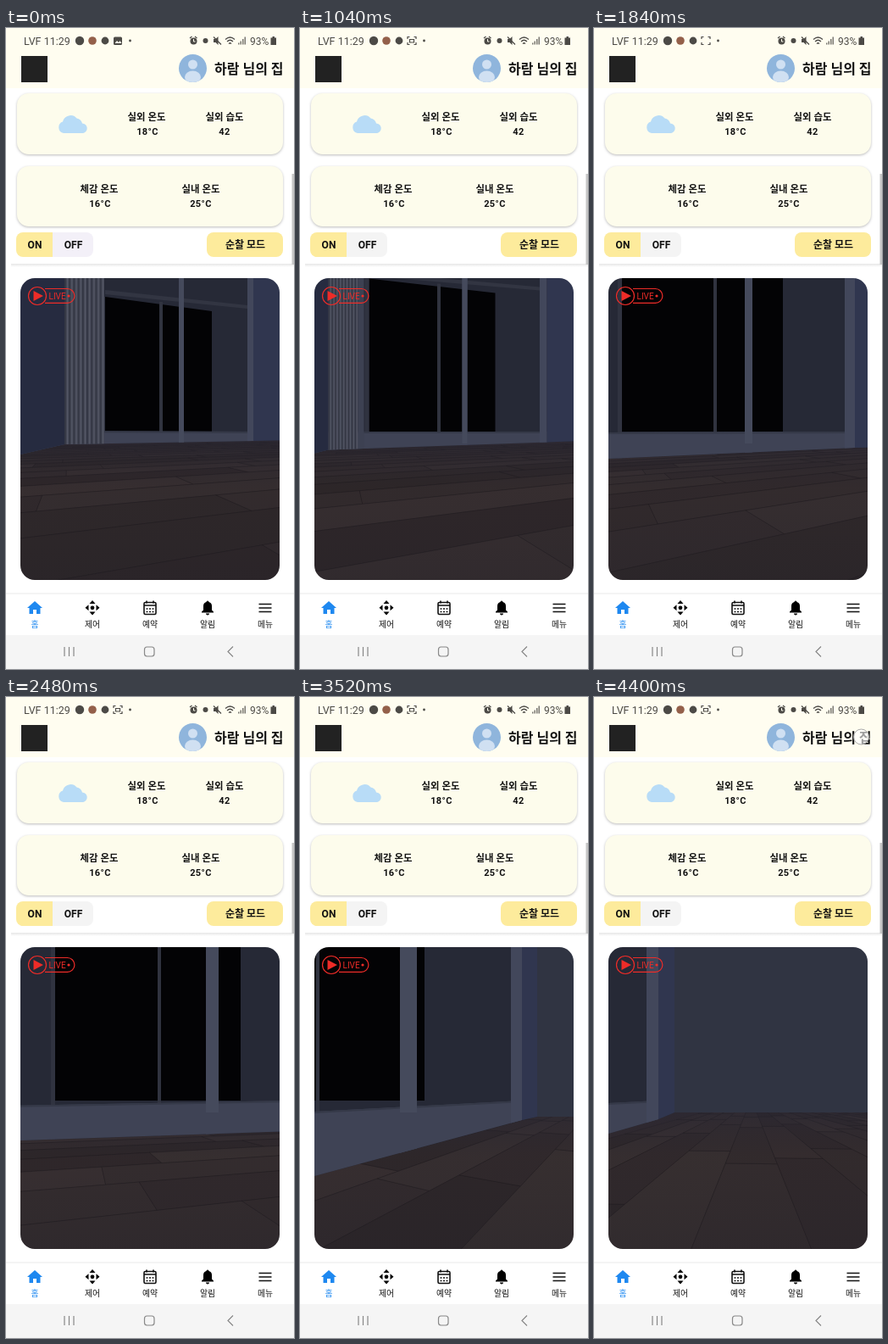
These frames come from a looping animation (340x756 px, 4480 ms). An HTML page with a canvas:

```html
<!DOCTYPE html>
<html lang="ko">
<head>
<meta charset="utf-8">
<style>
html, body { margin: 0; width: 100%; height: 100%; overflow: hidden; background: #fff; }
canvas { position: absolute; left: 17px; top: 295px; border-radius: 17px; }
svg { position: absolute; left: 0; top: 0; }
text { font-family: Roboto, "Noto Sans CJK KR", "Noto Sans CJK", sans-serif; fill: #111; }
.mid { text-anchor: middle; font-weight: 700; font-size: 11.4px; }
.num { letter-spacing: .4px; font-size: 11px; }
.btn { font-size: 12px; }
.tab { text-anchor: middle; font-size: 9.8px; }
.status { font-size: 12.5px; fill: #4c4a46; }
.card { fill: #fdfcec; filter: drop-shadow(0 1px 1.5px #0004); }
.line { fill: none; stroke: #111; stroke-width: 1.6; }
.gray { fill: none; stroke: #4c4a46; stroke-width: 1.2; }
.sys { fill: none; stroke: #888; stroke-width: 1.2; }
.live { fill: none; stroke: #ee2c28; stroke-width: 1.2; }
</style>
</head>
<body>
<canvas id="cam" width="306" height="356"></canvas>
<svg width="340" height="756" viewBox="0 0 340 756">
  <rect width="340" height="71" fill="#fffdf0"/>

  <!-- status bar -->
  <text class="status" x="21" y="19.5">LVF 11:29</text>
  <g fill="#4c4a46">
    <circle cx="87" cy="15" r="5.2"/>
    <circle cx="102" cy="15" r="4.8" fill="#94604a"/>
    <circle cx="117" cy="15" r="4.4"/>
    <g id="photo"><rect x="127" y="10.5" width="10" height="9.5" rx="1.5"/><path d="M128.5 18l2.5-3 2 2 1.5-2 2 3z" fill="#fffdf0"/></g>
    <circle cx="146.5" cy="15" r="1.4"/>
    <circle cx="221.500" cy="15.500" r="4"/>
    <circle cx="235.500" cy="15" r="3"/>
    <path d="M245 13h2.500l3-3v10l-3-3H245z"/>
    <path d="M274 19.500h1.500v-2H274zm2.500 0h1.500v-4h-1.500zm2.500 0h1.500v-6.500H279zm2.500 0h1.500v-9h-1.500z" opacity=".75"/>
    <path d="M312.500 11.500h2v-1.500h2.500v1.500h2v8.500h-6.500z"/>
  </g>
  <path class="gray" d="M217 12l2.500-2m6 2l-2.500-2M245 10.500l9 9M259 13.500q5.500-5 11 0M261 16q3.500-3.500 7 0M263 18.500q1.500-1.500 3 0"/>
  <path d="M221.500 13v3h2" fill="none" stroke="#fffdf0"/>
  <g id="scan" class="gray"><path d="M127 13v-2.500h2.500M134.500 10.500h2.500v2.500M137 17v2.500h-2.500M129.500 19.500h-2.500v-2.500"/><path id="scanMark" d="M129.500 13.500h5v3.500h-5z"/></g>
  <text class="status" x="288" y="19.5" style="font-size:12px">93%</text>

  <!-- header -->
  <rect x="18" y="33" width="31" height="31" fill="#222"/>
  <clipPath id="round"><circle cx="220.500" cy="47.500" r="16.500"/></clipPath>
  <g clip-path="url(#round)">
    <rect x="203" y="30" width="35" height="35" fill="#8fb5dc"/>
    <circle cx="220.500" cy="43" r="5.500" fill="#d0e0f2"/>
    <ellipse cx="220.500" cy="58" rx="9.500" ry="7.500" fill="#d0e0f2"/>
  </g>
  <text x="246" y="53.500" font-size="16" font-weight="700">하람 님의 집</text>
  <circle id="touch" cx="315.500" cy="47" r="9" fill="#fff9" stroke="#aaa"/>

  <!-- weather cards -->
  <rect class="card" x="13" y="77" width="314" height="72" rx="14"/>
  <rect class="card" x="13" y="163" width="314" height="71" rx="14"/>
  <path fill="#b8dcf7" d="M68 124a7 7 0 0 1-1-13.500a9.500 9.500 0 0 1 16.500-4a8 8 0 0 1 6.500 6a5.800 5.800 0 0 1 1 11.500z"/>
  <text class="mid" x="166" y="108.500">실외 온도</text><text class="mid num" x="167" y="126">18°C</text>
  <text class="mid" x="258" y="108.500">실외 습도</text><text class="mid num" x="258" y="126">42</text>
  <text class="mid" x="110" y="193.500">체감 온도</text><text class="mid num" x="111" y="211">16°C</text>
  <text class="mid" x="230" y="193.500">실내 온도</text><text class="mid num" x="230" y="211">25°C</text>

  <!-- buttons -->
  <path d="M55 241h40a8 8 0 0 1 8 8v13a8 8 0 0 1-8 8H55z" id="off"/>
  <path d="M55 241H20a8 8 0 0 0-8 8v13a8 8 0 0 0 8 8h35z" fill="#fdeb9c"/>
  <rect x="237" y="241" width="90" height="29" rx="8" fill="#fdeb9c"/>
  <text class="mid btn" x="34" y="260">ON</text>
  <text class="mid btn" x="79.500" y="260">OFF</text>
  <text class="mid btn" x="282.500" y="260">순찰 모드</text>
  <linearGradient id="fade" x2="0" y2="1"><stop stop-color="#e6e6e6"/><stop offset="1" stop-color="#fff"/></linearGradient>
  <rect x="6" y="278" width="334" height="4" fill="url(#fade)"/>
  <rect x="337.500" y="172" width="2.500" height="107" fill="#c6c6c6"/>

  <!-- live badge -->
  <circle class="live" cx="37" cy="316" r="10.500"/>
  <path class="live" d="M46 307.500h26.500a8.400 8.400 0 0 1 0 16.800H46"/>
  <path d="M32.500 310v12l11.500-6z" fill="#ee2c28"/>
  <text x="50.500" y="319.600" font-size="10" style="fill:#ee2c28">LIVE</text>
  <circle cx="74" cy="316" r="1.600" fill="#ee2c28"/>

  <!-- tabs -->
  <rect y="667" width="340" height="49" fill="#fff"/>
  <rect y="666.500" width="340" height="1" fill="#e9e9e9"/>
  <path d="M34 676l9 8h-2.500v7H36v-5h-4v5h-4.500v-7H25z" fill="#1e88f0"/>
  <path d="M102 675l3.500 4h-7zm0 17.500l3.500-4h-7zM93.500 683.800l4-3.500v7zm17 0l-4-3.500v7z"/>
  <circle cx="102" cy="683.800" r="2.400"/>
  <rect class="line" x="163" y="677.500" width="14" height="14" rx="1.500"/>
  <path class="line" d="M163 681h14M166 675.500v3M174 675.500v3"/>
  <path class="line" d="M165.500 685h9M165.500 688.500h9" stroke-dasharray="2 1.500"/>
  <path d="M238 675.500a1.500 1.500 0 0 1 1.500 1.500a5 5 0 0 1 3.500 5v4.500l2 2v1h-14v-1l2-2V682a5 5 0 0 1 3.500-5a1.500 1.500 0 0 1 1.500-1.500zM236 690.500h4a2 2 0 0 1-4 0z"/>
  <path class="line" d="M298.500 679.500h15M298.500 684h15M298.500 688.500h15"/>
  <text class="tab" x="34" y="706.500" style="fill:#1e88f0">홈</text>
  <text class="tab" x="102" y="706.500">제어</text>
  <text class="tab" x="170" y="706.500">예약</text>
  <text class="tab" x="238" y="706.500">알림</text>
  <text class="tab" x="306" y="706.500">메뉴</text>

  <!-- system navigation -->
  <rect y="716" width="340" height="40" fill="#f5f5f5"/>
  <path class="sys" d="M69 730v11M74.500 730v11M80 730v11M268 729.500l-6 6 6 6"/>
  <rect class="sys" x="163.500" y="730" width="11.500" height="11" rx="3"/>
</svg>
<script>
const $ = id => document.getElementById(id);
const ctx = $('cam').getContext('2d');
ctx.translate(-17, -295);

// time, curtain left/right, glass left, mullion, post left/right, glass right,
// frame left/right, corner, glass top, sill, floor line (4 heights), yaw, wall distance
const poses = [
  [0, 69, 116, 117, 183, 204, 210, 243, 285, 292, 340, 317, 475, 503, 491, 487, 486, 72, 17],
  [720, 57, 110, 111, 183, 207, 212, 246, 293, 302, 345, 305, 475, 500, 492, 487, 486, 74, 16],
  [1360, 10, 27, 52, 145, 176, 183, 215, 273, 281, 340, 286, 477, 503, 503, 490, 487, 64, 12],
  [1840, -20, 0, 33, 143, 178, 187, 223, 296, 308, 350, 270, 477, 508, 508, 495, 494, 64, 10],
  [2480, -40, 0, 58, 181, 236, 251, 277, 326, 338, 400, 260, 482, 523, 523, 512, 511, 76, 7],
  [3520, -200, -140, -95, 21, 118, 138, 147, 249, 262, 280, 250, 490, 565, 565, 499, 495, 32, 3.2],
  [4400, -300, -250, -200, -110, -75, -52, -42, 62, 76, 95, 250, 480, 515, 515, 498, 490, 3, 3.6]
];

const rand = n => { const v = Math.sin(n * 12.9898) * 43758.5453; return v - Math.floor(v); };

function poseAt(t) {
  const i = Math.max(1, poses.findIndex(p => p[0] >= t));
  const a = poses[i - 1], b = poses[i], k = (t - a[0]) / (b[0] - a[0]);
  return a.map((v, n) => v + (b[n] - v) * k);
}

function poly(points, fill, stroke) {
  ctx.beginPath();
  points.forEach(p => ctx.lineTo(...p));
  ctx.closePath();
  if (fill) { ctx.fillStyle = fill; ctx.fill(); }
  if (stroke) { ctx.strokeStyle = stroke; ctx.stroke(); }
}

function column(x1, x2, fill, y1 = 290, y2 = 660) {
  ctx.fillStyle = fill;
  ctx.fillRect(x1, y1, x2 - x1, y2 - y1);
}

// Keeps the part of a floor polygon in front of the camera
function clipNear(points, near = 1.2) {
  return points.flatMap((p, i) => {
    const q = points[(i + 1) % points.length], out = p[1] >= near ? [p] : [];
    if ((p[1] >= near) !== (q[1] >= near)) {
      const k = (near - p[1]) / (q[1] - p[1]);
      out.push([p[0] + (q[0] - p[0]) * k, near]);
    }
    return out;
  });
}

function drawFloor(t, yaw, dist) {
  column(17, 323, '#322a2e');
  const sin = Math.sin(yaw * Math.PI / 180), cos = Math.cos(yaw * Math.PI / 180);
  const shift = t / 1500, width = .8, length = 5;
  const toCamera = ([u, v]) => [(u - shift) * sin - (v + dist) * cos, (u - shift) * cos + (v + dist) * sin];
  ctx.lineWidth = .8;
  for (let row = 0; row < 38; row++) for (let n = -5; n < 6; n++) {
    const u = (n + rand(row)) * length, v = -row * width;
    const shape = clipNear([[u, v], [u + length, v], [u + length, v - width], [u, v - width]].map(toCamera));
    if (shape.length < 3) continue;
    const tone = rand(row * 31 + n * 7 + 90) * 15;
    poly(shape.map(([x, z]) => [170 + 300 * x / z, 474 + 300 / z]),
      `rgb(${44 + tone},${37 + tone * .85},${39 + tone * .75})`, 'rgba(24,19,23,.4)');
  }
  const haze = ctx.createLinearGradient(0, 485, 0, 651);
  haze.addColorStop(0, 'rgba(42,40,52,.7)');
  haze.addColorStop(.35, 'rgba(42,38,46,.15)');
  haze.addColorStop(1, 'rgba(36,34,42,.35)');
  column(17, 323, haze);
}

function drawRoom(t) {
  const [, curtainL, curtainR, glassL, mullion, postL, postR, glassR, frameL, frameR, corner,
    top, sill, y0, y1, y2, y3, yaw, dist] = poseAt(t);
  drawFloor(t, yaw, dist);
  ctx.save();
  ctx.beginPath();
  [[0, 290], [0, y0], [17, y0], [Math.max(17, curtainL), y1], [frameR, y2], [corner, y3],
    [Math.max(corner, 340), y3], [420, 290]].forEach(p => ctx.lineTo(...p));
  ctx.clip();

  column(0, 340, '#262936');
  poly([[glassL, top], [glassR, top + 17], [glassR, 476], [glassL, 476]], '#030305');
  poly([[glassL, top - 8], [frameL, top + 10], [frameL, top + 14], [glassL, top - 3]], '#323542');
  column(glassL - 5, glassL, '#303340', top);
  column(mullion - 2, mullion + 2, '#30333f', top + 6);
  column(postL, postR, '#454a5c');
  poly([[0, sill], [frameR, 476], [frameR, 600], [0, 600]], '#3f4355');
  poly([[0, sill], [frameR, 476], [frameR, 478], [0, sill + 2]], '#353948');
  column(postL, postR, '#454a5c', 290, 490);
  if (glassL - curtainR > 12) column(curtainR, curtainR + 7, '#3d4152');

  column(-20, curtainL, '#262b40');
  column(curtainL, curtainR, '#454856');
  const fold = (curtainR - curtainL) / 9;
  for (let i = 0; i < 9; i++) {
    const x = curtainL + i * fold;
    column(x, x + fold * .35, '#343744');
    column(x + fold * .6, x + fold * .8, '#565968');
  }

  column(frameL, frameR, '#42475b');
  column(frameR, corner, '#30364f');
  column(corner, 420, '#303442');
  ctx.restore();
}

function frame(now) {
  const t = Math.floor(now % 4480 / 80) * 80, phase = t % 1120;
  const show = (id, on) => $(id).style.display = on ? '' : 'none';
  drawRoom(t);
  show('photo', t < 560);
  show('scan', t >= 560);
  show('scanMark', phase < 480 || phase > 880);
  show('touch', t >= 4320);
  $('off').setAttribute('fill', t < 320 ? '#f3f0f8' : '#f4f4f4');
  requestAnimationFrame(frame);
}
requestAnimationFrame(frame);
</script>
</body>
</html>
```
